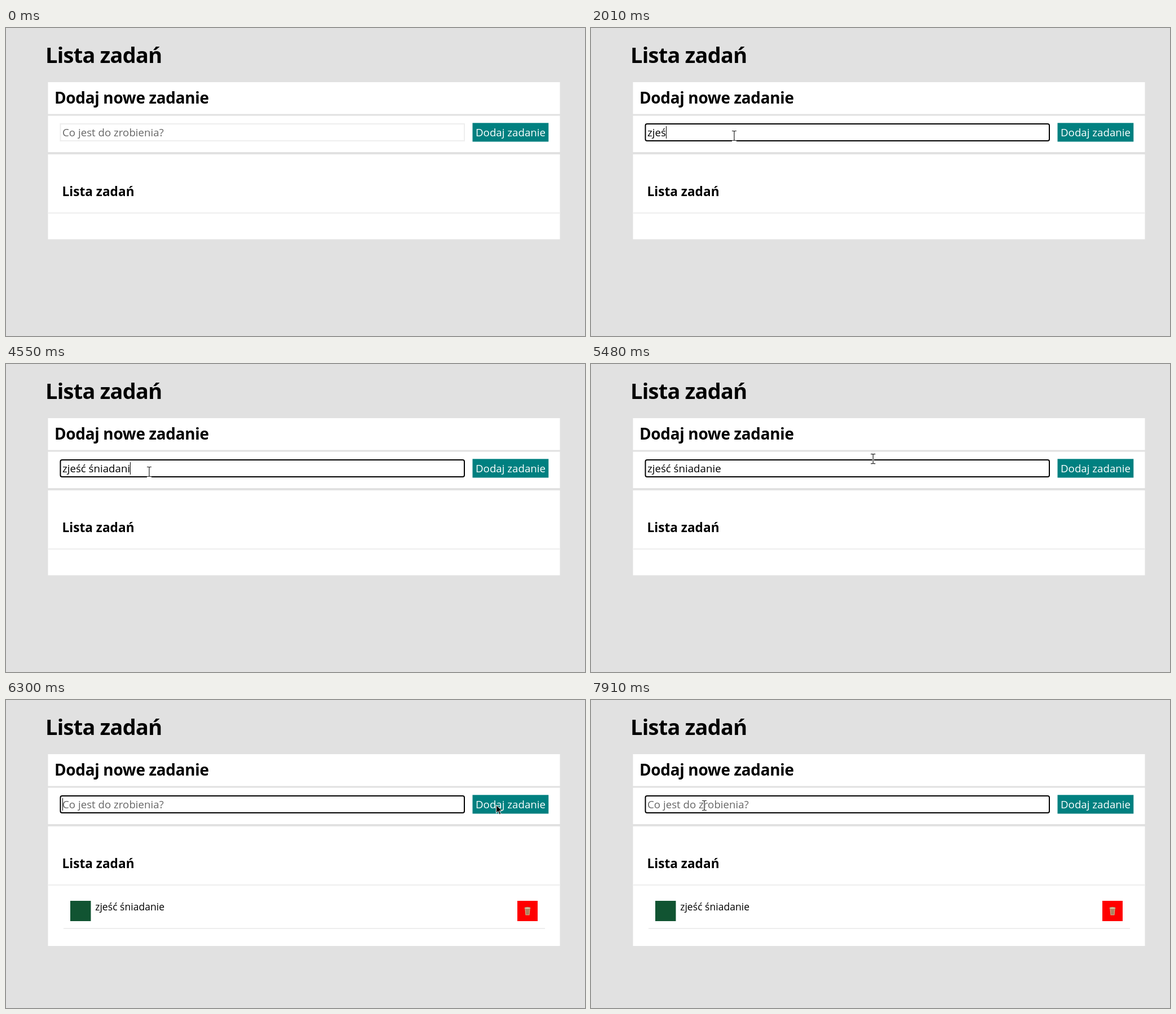
An HTML page that plays this animation: 1027 by 546 pixels, repeating every 8000 ms.

```html
<!DOCTYPE html>
<html lang="pl">
<head>
<meta charset="utf-8">
<title>Lista zadań</title>
<style>
  html, body { margin: 0; width: 100%; height: 100%; overflow: hidden; background: #e1e1e1; }
  svg { display: block; width: 100%; height: 100%; }
  text { font-family: "Open Sans", "Noto Sans", sans-serif; font-size: 18.7px; white-space: pre; }
  .bold { font-weight: 700; }
  .title { font-size: 38px; letter-spacing: -.75px; }
  .heading { font-size: 28px; letter-spacing: -.36px; }
  .subheading { font-size: 22.7px; }
  .small { font-size: 17.6px; }
  .card { fill: #fff; }
  .line { fill: #eee; }
  #field { fill: #fff; stroke: #eee; stroke-width: 2; }
  .focus #field { stroke: #000; rx: 3px; }
  #hint { fill: #666; }
  #arrow { fill: #000; stroke: #fff; stroke-width: 1; }
  .press #arrow { fill: #5a3c08; stroke: #c9b45a; }
  #beam { fill: none; stroke: #222; stroke-width: 1.2; }
  #click { fill: rgba(235, 245, 40, .62); }
</style>
</head>
<body>
<svg id="stage" viewBox="0 0 1027 546" preserveAspectRatio="none">
  <text class="bold title" x="70" y="61.5">Lista zadań</text>

  <rect class="card" x="74.5" y="96" width="908" height="56.5"/>
  <text class="bold heading" x="86" y="134">Dodaj nowe zadanie</text>

  <rect class="card" x="74.5" y="155.5" width="908" height="64.5"/>
  <rect id="field" x="96.5" y="170" width="716.5" height="30"/>
  <text id="hint" x="100" y="191.7">Co jest do zrobienia?</text>
  <text id="typed" x="100" y="191.7"></text>
  <rect id="caret" y="174" width="1" height="22"/>
  <rect x="827.5" y="168.3" width="134.8" height="33.2" fill="#008080"/>
  <text x="833" y="191.7" fill="#fff">Dodaj zadanie</text>

  <rect id="list" class="card" x="74.5" y="224" width="908"/>
  <text class="bold subheading" x="99.4" y="298">Lista zadań</text>
  <rect class="line" x="75" y="327" width="907" height="2"/>

  <g id="item">
    <rect x="114" y="356" width="36.5" height="36" fill="#115432"/>
    <text class="small" x="158.2" y="372.5">zjeść śniadanie</text>
    <rect x="907" y="356" width="36" height="36" fill="#f00"/>
    <path d="M920.3 369.5H929.7L928.6 381.5H921.4Z" fill="#c9a27c"/>
    <path d="M923 371l.5 9M925 371v9M927 371l-.5 9" stroke="#8a6045" stroke-width=".8"/>
    <ellipse cx="925" cy="369" rx="5.4" ry="2" fill="#d8c3a0" stroke="#8a6045" stroke-width=".6"/>
    <rect class="line" x="102" y="404" width="854" height="2"/>
  </g>

  <g id="pointer">
    <circle id="click" r="15"/>
    <path id="arrow" d="M0 0V14.5L3.4 11.3L5.8 17L8.3 16L5.9 10.5H10.4Z"/>
    <g id="beam">
      <path d="M-4 -8.5H4M0 -8V8M-4 8.5H4" stroke="#fff" stroke-width="3"/>
      <path d="M-4 -8.5H-1L0 -7.5L1 -8.5H4M0 -7.5V7.5M-4 8.5H-1L0 7.5L1 8.5H4"/>
    </g>
  </g>
</svg>
<script>
  const LOOP = 8000, BLINK = 530, PRESS = 140;
  const TASK = "zjeść śniadanie";
  const ENTER = 130, FOCUS = 740, SUBMIT = 6160, REFOCUS = 7380;
  const ADDED = SUBMIT + PRESS;

  const bursts = [
    { from: 1350, every: 218, count: 6 },
    { from: 3420, every: 330, count: 1 },
    { from: 3750, every: 133, count: 8 }
  ];
  const keys = bursts.flatMap(b => Array.from({ length: b.count }, (_, i) => b.from + i * b.every));

  const entry = { x: 469, y: 346 };
  const moves = [
    { from: ENTER, to: 270, x: 250, y: 169, lift: 0 },
    { from: 400, to: 540, x: 254, y: 191, lift: 0 },
    { from: 5280, to: 6050, x: 872, y: 186, lift: 22 },
    { from: ADDED, to: 6720, x: 201, y: 187, lift: 0 }
  ];

  const el = {};
  document.querySelectorAll("[id]").forEach(node => el[node.id] = node);
  const show = (node, on) => node.setAttribute("visibility", on ? "inherit" : "hidden");
  const clamp = v => Math.min(1, Math.max(0, v));
  const easeOut = u => Math.sin(u * Math.PI / 2);

  function pointerAt(t) {
    let { x, y } = entry;
    for (const m of moves) {
      const p = easeOut(clamp((t - m.from) / (m.to - m.from)));
      x += (m.x - x) * p;
      y += (m.y - y) * p - m.lift * Math.sin(Math.PI * p);
    }
    return { x, y };
  }

  function drawField(t) {
    const added = t >= ADDED;
    const focus = t >= FOCUS && (t < SUBMIT || added);
    const text = added ? "" : TASK.slice(0, keys.filter(k => k <= t).length);
    if (el.typed.textContent !== text) el.typed.textContent = text;
    const width = text ? el.typed.getComputedTextLength() : 0;

    // every input restarts the caret's blinking
    const lastInput = Math.max(...[FOCUS, ...keys, ADDED].filter(k => k <= t));
    const lit = (t - lastInput) % (2 * BLINK) < BLINK;

    el.caret.setAttribute("x", Math.round(100 + width));
    el.stage.classList.toggle("focus", focus);
    show(el.caret, focus && lit);
    show(el.hint, !text);
    show(el.item, added);
    el.list.setAttribute("height", added ? 212 : 150.5);
  }

  function drawPointer(t) {
    const { x, y } = pointerAt(t);
    const inField = x > 96 && x < 814 && y > 165 && y < 202;
    const press = [FOCUS, SUBMIT, REFOCUS].some(c => t >= c && t < c + PRESS);
    el.pointer.setAttribute("transform", `translate(${x} ${y})`);
    el.stage.classList.toggle("press", press);
    show(el.pointer, t >= ENTER);
    show(el.beam, inField);
    show(el.arrow, !inField);
    show(el.click, press);
  }

  const start = performance.now();
  function frame() {
    const t = (performance.now() - start) % LOOP;
    drawField(t);
    drawPointer(t);
    requestAnimationFrame(frame);
  }
  frame();
</script>
</body>
</html>
```
